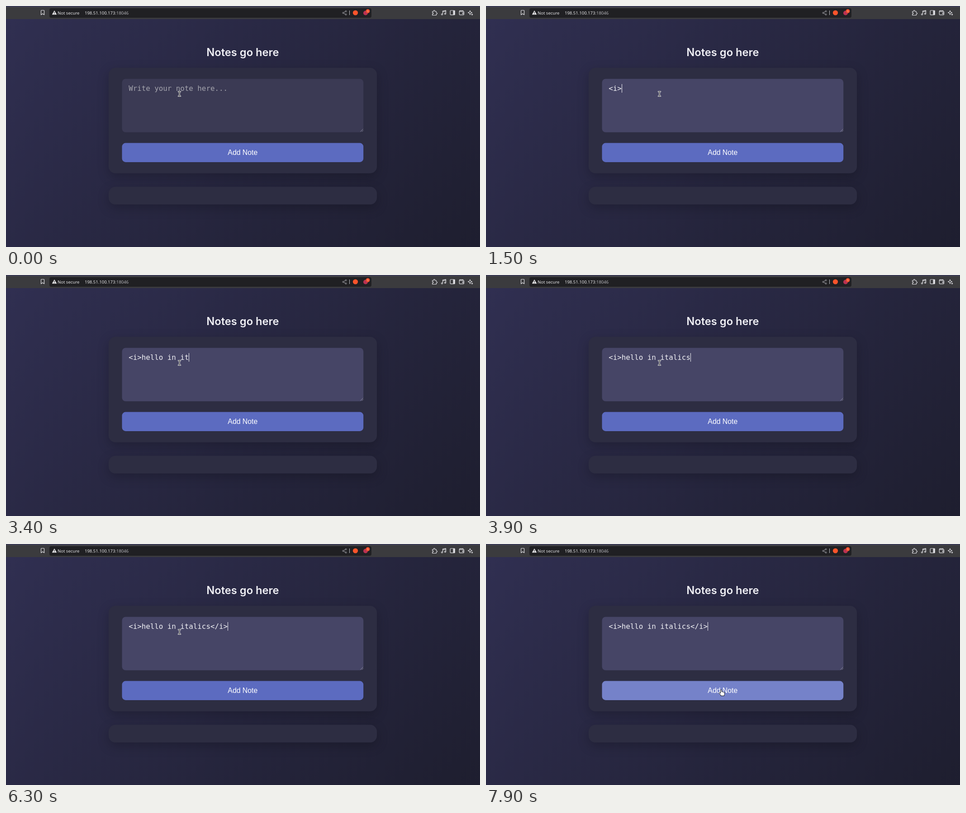
Recreate the animation shown at these times as an HTML page. Size 1048 by 534 pixels, loop 8000 ms.

```html
<!DOCTYPE html>
<html lang="en">
<head>
<meta charset="utf-8">
<title>Notes</title>
<style>
  html, body { margin: 0; width: 100%; height: 100%; overflow: hidden; background: #26263c; }
  svg { display: block; width: 100%; height: 100%; }
  text { white-space: pre; }
  .ui { font: 9.5px "Noto Sans", "Open Sans", sans-serif; }
  .mono { font: 15.8px "DejaVu Sans Mono", monospace; }
  .title { font: 600 23.7px Inter, sans-serif; }
  .label { font: 15.8px "Liberation Sans", Arial, sans-serif; }
  .card { fill: #2d2d42; filter: drop-shadow(0 8px 12px rgba(0, 0, 0, .2)); }
  .icon { fill: none; stroke: #dcdce0; stroke-width: 1.2; stroke-linejoin: round; stroke-linecap: round; }
</style>
</head>
<body>
<svg viewBox="0 0 1048 534">
  <defs>
    <linearGradient id="bg" gradientUnits="userSpaceOnUse" x1="135.75" y1="-106.75" x2="912.25" y2="669.75">
      <stop offset="0" stop-color="#302f51"/>
      <stop offset="1" stop-color="#1e1e2f"/>
    </linearGradient>
  </defs>
  <rect width="1048" height="534" fill="url(#bg)"/>

  <!-- Browser bar -->
  <rect width="1048" height="29" fill="#3b3b3e"/>
  <rect width="1048" height="1" fill="#22223a"/>
  <rect y="1" width="1048" height="1" fill="#50506e"/>
  <rect x="96" y="5" width="712" height="21" rx="4" fill="#202023"/>
  <path class="icon" d="M77.5 10.5q0-1 1-1h5q1 0 1 1v9l-3.5-2.6-3.5 2.6z"/>
  <path d="M107 10.7l4.6 8h-9.2z" fill="#e4e4e6" stroke="#e4e4e6" stroke-linejoin="round"/>
  <path d="M107 13v3m0 1v1" stroke="#202023" stroke-width="1.2"/>
  <text class="ui" x="114" y="18.6" fill="#e6e6e8">Not secure</text>
  <text class="ui" x="174" y="18.6" fill="#e6e6e8">198.51.100.173<tspan fill="#b4b4b9">:18046</tspan></text>
  <g stroke="#a8a8ae" fill="none">
    <path d="M746.5 14.5l4-2.3m-4 3.9l4 2.2"/>
    <circle cx="745.5" cy="15.3" r="1.5"/>
    <circle cx="751.5" cy="11.7" r="1.5"/>
    <circle cx="751.5" cy="18.8" r="1.5"/>
    <path d="M759.5 10v10" stroke="#c4c4c8"/>
  </g>
  <circle cx="772.5" cy="15" r="5.6" fill="#fb542b"/>
  <circle cx="795" cy="15.5" r="5" fill="#b83252"/>
  <circle cx="800" cy="11.3" r="4.4" fill="#f4512c"/>
  <text x="800" y="13.5" text-anchor="middle" fill="#fff" style="font:6px 'Noto Sans',sans-serif">1</text>
  <g class="icon">
    <path d="M942.7 12h2.8q-.4-2.3 1.4-2.3t1.4 2.3h3v3q2.2-.2 2.2 1.4t-2.2 1.4v2.7h-8.6v-2.8q2.2.1 2.2-1.4t-2.2-1.5z"/>
    <path d="M965.5 18.4v-7.2l7-1.4v7.2M965.5 13l7-1.4"/>
    <circle cx="964" cy="18.5" r="1.5"/>
    <circle cx="971" cy="17.1" r="1.5"/>
    <rect x="982.2" y="10" width="10" height="9.6" rx="1"/>
    <path d="M1003 12.2h8.3q1.2 0 1.2 1v5.4q0 1-1 1h-8q-1.2 0-1.2-1.2v-6.6q0-1.5 1.5-1.5h6.8v1.9m1.9 2.7h-3v2.4h3"/>
    <path d="M1026 10q.6 4 4.5 4.7-3.9.7-4.5 4.6-.6-3.9-4.5-4.6 3.9-.7 4.5-4.7zM1030.5 17.3v3m-1.5-1.5h3"/>
  </g>
  <rect x="988.5" y="10" width="4" height="9.6" fill="#dcdce0"/>

  <!-- Page -->
  <text class="title" x="523.4" y="111.2" text-anchor="middle" fill="#f0f0f5">Notes go here</text>
  <rect class="card" x="227" y="137" width="593" height="233.7" rx="15"/>
  <rect class="card" x="227" y="400.5" width="593" height="39.3" rx="15"/>
  <rect id="field" x="256.5" y="161.5" width="533.7" height="118.3" rx="8"/>
  <path d="M783.5 278.5l6-6m-2.5 6l3-3" stroke="#9c9caa" stroke-width=".8"/>
  <rect id="button" x="256.5" y="303.6" width="533.7" height="42.3" rx="8"/>
  <text class="label" x="523.3" y="329.8" text-anchor="middle" fill="#fff">Add Note</text>
  <text class="mono" id="hint" x="271.2" y="187.8" fill="#a5a5ae">Write your note here...</text>
  <text class="mono" id="typed" x="271.2" y="187.8" fill="#f2f2f6"></text>
  <rect id="caret" y="173" width="1" height="19" fill="#f2f2f6"/>

  <g id="beam" fill="none" stroke-linecap="square">
    <path d="M-2-5h1.2l.8.6.8-.6H2M0-4.4v8.8M-2 5h1.2l.8-.6.8.6H2" stroke="#fff" stroke-width="2.6"/>
    <path d="M-2-5h1.2l.8.6.8-.6H2M0-4.4v8.8M-2 5h1.2l.8-.6.8.6H2" stroke="#111" stroke-width="1"/>
  </g>
  <path id="hand" fill="#fff" stroke="#16161c" stroke-linejoin="round"
    d="M-1.5 8.5V1.4q0-1.4 1.3-1.4t1.3 1.4V5q1.5-.8 2.3.5 1.5-.6 2.2.6 1.9-.4 1.9 1.4v2.3q0 1.4-.8 2.3v1.8H-.8v-1.4L-4.4 8.8q-.8-1.3.3-1.8 1-.4 2.6 1.5z"/>
</svg>
<script>
  const LOOP = 8000, STEP = 100, LEFT = 271, ADVANCE = 9.51;
  const $ = id => document.getElementById(id);
  const [field, button, hint, typed, caret, beam, hand] =
    ["field", "button", "hint", "typed", "caret", "beam", "hand"].map($);

  // [time, keys]; "\b" deletes one character
  const keys = [
    [600, "<"], [1100, "i"], [1500, ">"],
    [2200, "h"], [2300, "e"], [2400, "l"],
    [2600, "l"], [2700, "o"], [2800, " "], [2900, "i"], [3000, "n "],
    [3200, "i"], [3400, "t"], [3500, "a"], [3600, "li"], [3800, "c"], [3900, "s"],
    [4400, ","], [4700, "\b"], [4800, "<"], [5000, "i"], [5300, "\b"],
    [5600, "/"], [6000, "i"], [6300, ">"]
  ];
  const caretOff = [[0, 300], [2100, 2200], [6900, 7500]];

  // [time, x, y, shape]
  const moves = [
    [0, 383.5, 194.7, beam], [7500, 395, 206, beam], [7600, 438, 243, beam],
    [7700, 482, 272, beam], [7800, 508, 306.5, hand], [7900, 520, 322.5, hand]
  ];

  const mix = (a, b, k) => `rgb(${a.map((v, i) => Math.round(v + (b[i] - v) * k))})`;
  const clamp = v => Math.min(1, Math.max(0, v));

  function textAt(t) {
    let s = "";
    for (const [at, k] of keys) {
      if (at > t) break;
      s = k === "\b" ? s.slice(0, -1) : s + k;
    }
    return s;
  }

  function draw(t) {
    const s = textAt(t);
    typed.textContent = s;
    hint.style.display = s ? "none" : "";
    caret.setAttribute("x", Math.round(LEFT + s.length * ADVANCE));
    caret.style.display = caretOff.some(([a, b]) => t >= a && t < b) ? "none" : "";
    field.setAttribute("fill", mix([59, 58, 84], [70, 69, 102], clamp((t - 200) / 400)));
    button.setAttribute("fill", t >= 7900 ? "#7582c9" : "#5c6bc0");

    const [, x, y, shape] = moves.filter(m => m[0] <= t).pop();
    for (const el of [beam, hand]) el.style.display = el === shape ? "" : "none";
    shape.setAttribute("transform", `translate(${x} ${y})`);
  }

  const start = performance.now();
  function tick() {
    const t = (performance.now() - start) % LOOP;
    draw(Math.floor(t / STEP) * STEP);
    requestAnimationFrame(tick);
  }
  tick();
</script>
</body>
</html>
```
